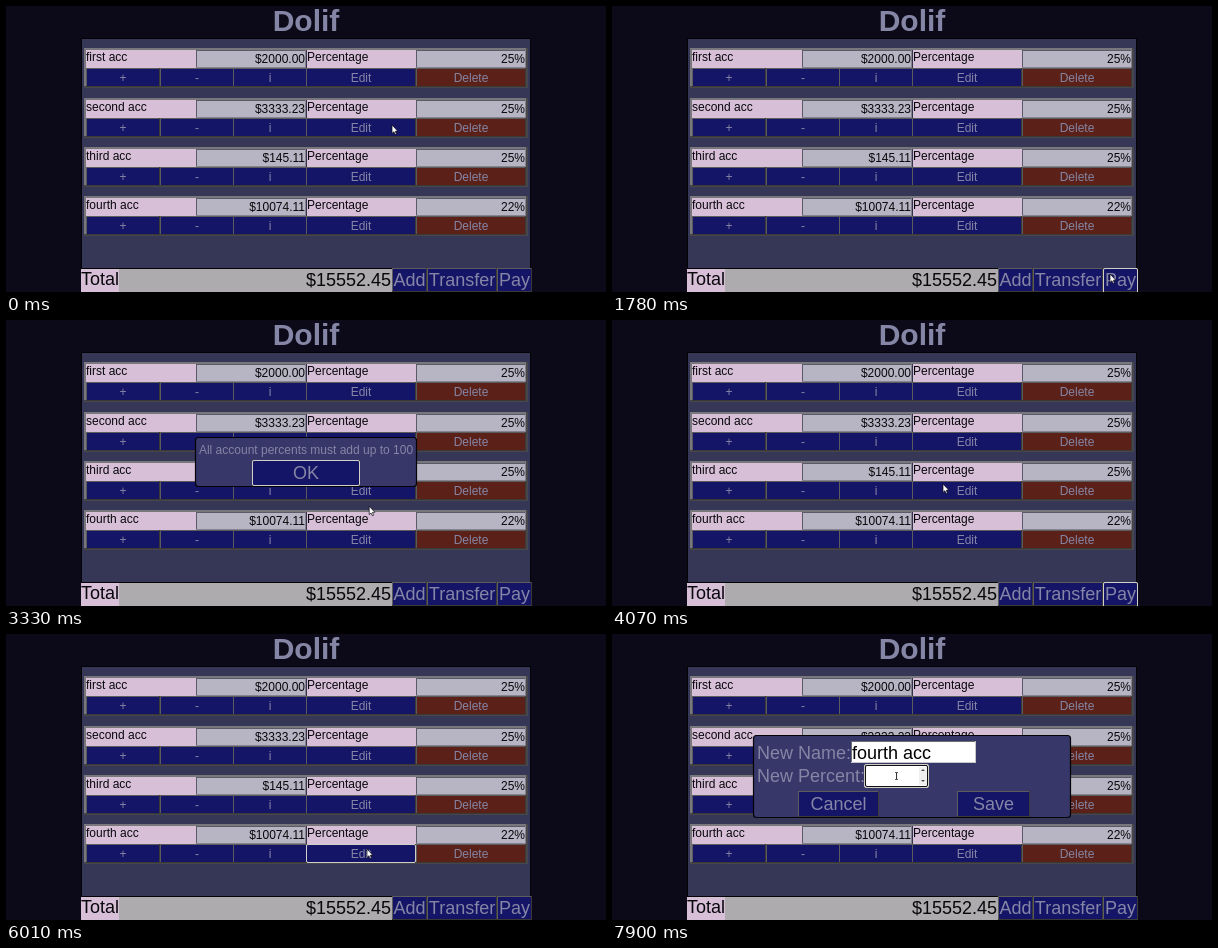
These frames come from a looping animation (600x286 px, 8000 ms). An HTML page with a canvas:

```html
<!DOCTYPE html>
<html lang="en">
<head>
<meta charset="utf-8">
<title>Dolif</title>
<style>
html, body { margin: 0; width: 100%; height: 100%; overflow: hidden; background: #0c0a18; }
canvas { display: block; width: 600px; height: 286px; }
</style>
</head>
<body>
<canvas id="stage"></canvas>
<script>
const LOOP = 8000;
const FACE = '"Liberation Sans", Arial, sans-serif';
const C = {
  page: '#0c0a18', panel: '#363657', modal: '#37376a', thistle: '#d8bfd8',
  value: '#b7b5c3', total: '#adabad', navy: '#151568', red: '#5b2118',
  label: '#8585a5', ink: '#08080c'
};
const accounts = [
  ['first acc', '$2000.00', '25%'],
  ['second acc', '$3333.23', '25%'],
  ['third acc', '$145.11', '25%'],
  ['fourth acc', '$10074.11', '22%']
];

// Pointer moves: first step, last step, number of steps, end point, ease-out power
const moves = [
  [750, 850, 3, 414, 157, 1],
  [1030, 1110, 3, 478, 241, 1.5],
  [1350, 1500, 5, 498, 268, 1.5],
  [2290, 2290, 1, 455, 237, 1],
  [2340, 2950, 14, 376, 195, 1.5],
  [3330, 3510, 5, 331, 164, 1.5],
  [4350, 5040, 15, 487, 204, 1.3],
  [5270, 5400, 4, 390, 205, 1.3],
  [5550, 5830, 7, 361, 215, 1.5],
  [6520, 6980, 11, 284, 142, 1.5]
];

const canvas = document.getElementById('stage');
const ratio = window.devicePixelRatio || 1;
canvas.width = 600 * ratio;
canvas.height = 286 * ratio;
const ctx = canvas.getContext('2d');
ctx.scale(ratio, ratio);

function rect(x, y, w, h, color) {
  ctx.fillStyle = color;
  ctx.fillRect(x, y, w, h);
}

function text(str, x, y, size, color, align = 'left', weight = '') {
  ctx.font = `${weight} ${size}px ${FACE}`;
  ctx.textAlign = align;
  ctx.fillStyle = color;
  ctx.fillText(str, x, y);
}

function bevel(x, y, w, h, light, dark, size = 1) {
  rect(x, y, w, size, light);
  rect(x, y, size, h, light);
  rect(x, y + h - size, w, size, dark);
  rect(x + w - size, y, size, h, dark);
}

function ring(x, y, w, h, color = '#d0d0c8') {
  ctx.strokeStyle = color;
  ctx.lineWidth = 1;
  ctx.beginPath();
  ctx.roundRect(x + 0.5, y + 0.5, w - 1, h - 1, 1.5);
  ctx.stroke();
}

function button(str, x, y, w, h, size, { fill = C.navy, focus = false, pressed = false } = {}) {
  const light = '#5c5c5c', dark = '#3a3936';
  rect(x, y, w, h, fill);
  bevel(x, y, w, h, pressed ? dark : light, pressed ? light : dark);
  text(str, x + w / 2, y + h / 2 + size * 0.35, size, C.label, 'center');
  if (focus) ring(x, y, w, h);
}

function cell(str, x, y, w, fill, right) {
  rect(x, y, w, 18, fill);
  if (right) {
    bevel(x, y, w, 18, '#5b5a68', '#85838f');
    text(str, x + w - 1, y + 13, 12, C.ink, 'right');
  } else {
    text(str, x, y + 11, 12, C.ink);
  }
}

function account([name, amount, percent], i, focus) {
  const y = Math.round(42.3 + 49.2 * i);
  rect(78, y, 444, 40, '#33334a');
  bevel(78, y, 444, 40, '#77777c', '#46464b', 2);
  cell(name, 80, y + 2, 110, C.thistle);
  cell(amount, 190, y + 2, 110, C.value, true);
  cell('Percentage', 301, y + 2, 109, C.thistle);
  cell(percent, 410, y + 2, 110, C.value, true);
  const by = y + 20;
  ['+', '-', 'i'].forEach((s, k) => button(s, Math.round(80 + 73.5 * k), by, 74, 19, 12));
  button('Edit', 300, by, 110, 19, 12, { focus });
  button('Delete', 410, by, 110, 19, 12, { fill: C.red });
}

function modal(x, y, w, h) {
  ctx.beginPath();
  ctx.roundRect(x + 0.5, y + 0.5, w - 1, h - 1, 3);
  ctx.fillStyle = C.modal;
  ctx.fill();
  ctx.strokeStyle = '#030306';
  ctx.lineWidth = 1.2;
  ctx.stroke();
}

function warning(t) {
  modal(189, 117, 222, 50);
  text('All account percents must add up to 100', 300, 134, 12, C.label, 'center');
  button('OK', 246, 140, 108, 26, 18, { focus: true, pressed: t >= 3840 && t < 3870 });
}

function input(str, x, y, w, h, focus) {
  rect(x, y, w, h, '#fff');
  bevel(x, y, w, h, '#6d6d72', '#c8c8cc');
  if (focus) {
    ring(x, y, w, h, '#101010');
    ring(x - 1, y - 1, w + 2, h + 2);
  }
  text(str, x + 1, y + h / 2 + 6.5, 18, '#000');
}

function spinner() {
  rect(307, 133, 8, 18, '#efefef');
  ctx.fillStyle = '#505050';
  for (const [y, d] of [[137, -2], [146, 2]]) {
    ctx.beginPath();
    ctx.moveTo(309, y);
    ctx.lineTo(313, y);
    ctx.lineTo(311, y + d);
    ctx.fill();
  }
}

function editor(t) {
  const onPercent = t >= 7160;
  const percent = t < 7540 ? '22' : t < 7900 ? '2' : '';
  modal(141, 101, 318, 83);
  text('New Name:', 145, 124.5, 18, C.label);
  text('New Percent:', 145, 148, 18, C.label);
  input('fourth acc', 239, 107, 125, 22, !onPercent);
  input(percent, 253, 131, 63, 22, onPercent);
  if (!onPercent && t < 6750) rect(319, 109, 1, 18, '#222');
  if (t >= 6940) spinner();
  button('Cancel', 186, 157, 81, 26, 18);
  button('Save', 345, 157, 73, 26, 18);
}

function pointerAt(t) {
  let x = 386, y = 119;
  for (const [start, end, n, toX, toY, power] of moves) {
    if (t < start) break;
    const gap = (end - start) / Math.max(1, n - 1) || 1;
    const step = Math.min(n, Math.floor((t - start) / gap + 0.01) + 1);
    const p = 1 - Math.pow(1 - step / n, power);
    x += (toX - x) * p;
    y += (toY - y) * p;
  }
  return [x, y];
}

function arrow(x, y) {
  const shape = [[0, 0], [0, 8.4], [1.9, 6.8], [3.1, 9.6], [4.4, 9.1], [3.3, 6.3], [5.7, 6.1]];
  ctx.beginPath();
  shape.forEach(([dx, dy]) => ctx.lineTo(x + dx, y + dy));
  ctx.closePath();
  ctx.strokeStyle = '#08080c';
  ctx.lineWidth = 0.7;
  ctx.fillStyle = '#fff';
  ctx.fill();
  ctx.stroke();
}

function beam(x, y) {
  rect(x, y - 4, 1, 8, '#333');
  rect(x - 1, y - 4, 3, 1, '#555');
  rect(x - 1, y + 3, 3, 1, '#555');
}

function draw(t) {
  rect(0, 0, 600, 286, C.page);
  text('Dolif', 300, 25, 30, C.label, 'center', 'bold');
  rect(75, 32, 450, 231, '#030306');
  rect(76, 33, 448, 229, C.panel);

  const focusRow = t >= 30 && t < 1780 ? 2 : t >= 6010 && t < 6240 ? 3 : -1;
  accounts.forEach((a, i) => account(a, i, i === focusRow));

  rect(75, 263, 38, 23, C.thistle);
  rect(113, 263, 273, 23, C.total);
  text('Total', 75, 279, 18, C.ink);
  text('$15552.45', 385, 280, 18, C.ink, 'right');
  button('Add', 386, 262, 35, 24, 18);
  button('Transfer', 421, 262, 70, 24, 18);
  button('Pay', 491, 262, 35, 24, 18);
  const payFocus = (t >= 1780 && t < 1960) || (t >= 4070 && t < 6010);
  if (payFocus) ring(491, 262, 35, 26);

  if (t >= 1960 && t < 4070) warning(t);
  if (t >= 6240) editor(t);

  const [x, y] = pointerAt(t);
  if (t >= 6940) beam(Math.round(x), Math.round(y));
  else arrow(x, y);
}

const begin = performance.now();
function frame() {
  draw((performance.now() - begin) % LOOP);
  requestAnimationFrame(frame);
}
frame();
</script>
</body>
</html>
```
